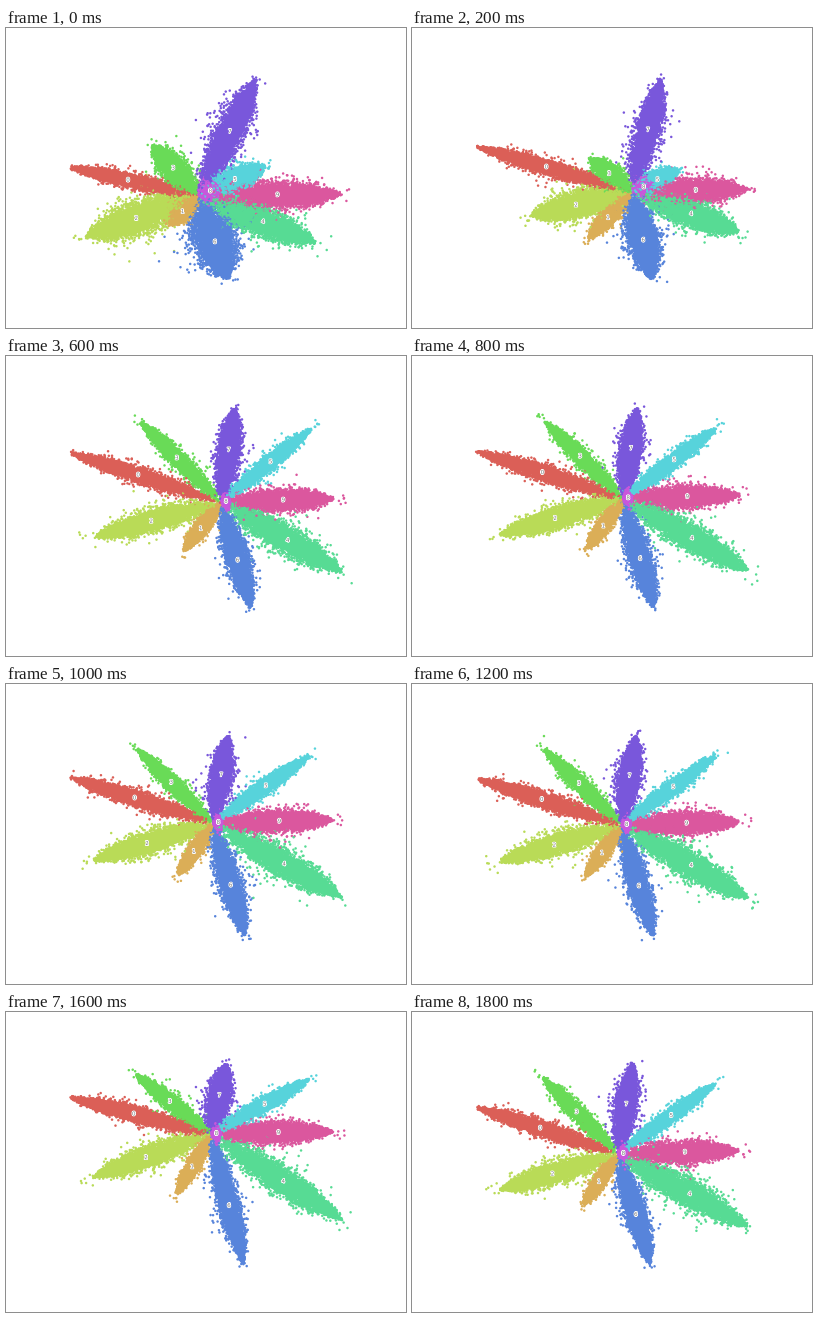
Recreate the animation shown at these times as a matplotlib script. Size 400x300 px, loop 2 s.

```python
import colorsys

import matplotlib.pyplot as plt
import numpy as np
from matplotlib.animation import FuncAnimation
from matplotlib.patheffects import Normal, Stroke

FRAMES, INTERVAL = 10, 200
POINTS = 4500                   # per class
CENTRE = 0.56                   # where a petal's middle lies on its axis
BOX = np.array([[64, 46.5], [346, 256.5]])      # plot limits
REACH = np.array([[67, 53], [334, 250]])        # how far the petals extend

COLORS = np.array([colorsys.hls_to_rgb(i / 10 + 0.01, 0.6, 0.65)
                   for i in range(10)])

# Per class: tip seen from the hub when folded, opening and open,
# then the half width when folded and when open.
PETALS = [
    ((-127, -29), (-150, -45), (-139, -43), 7, 8),
    ((-28, 28), (-42, 47), (-34, 50), 8, 6),
    ((-112, 40), (-98, 24), (-117, 36), 18, 11),
    ((-45, -51), (-40, -33), (-74, -70), 12, 7),
    ((116, 46), (111, 40), (121, 72), 15, 14),
    ((66, -30), (48, -22), (90, -64), 11, 7),
    ((30, 82), (21, 88), (30, 109), 23, 11),
    ((57, -118), (30, -112), (14, -83), 15, 11),
    ((22, -9), (22, -9), (9, -1), 9, 6),
    ((142, -2), (120, -3), (113, -3), 14, 11),
]

# The hub drifts through these points.
HUB_STEPS = [0, 1, 3, 5, 7, 8, 9]
HUB_X = [192, 220, 215, 207, 212, 205, 206]
HUB_Y = [168, 164, 146, 139, 143, 122, 142]


def fit(tips, hub):
    """Stretch each side of the flower so that it fills the plot."""
    low = (REACH[0] - hub) / tips.min(axis=0)
    high = (REACH[1] - hub) / tips.max(axis=0)
    return tips * np.where(tips < 0, low, high)


def petal(rng, hub, tip, half):
    """Points of a soft spindle from the hub to the tip, a few beyond it."""
    s = 1.02 * rng.beta(2.6, 2.1, POINTS)
    side = rng.normal(0, half / 2.4, POINTS) * (4 * s * abs(1 - s)) ** 0.6
    side *= np.where(rng.random(POINTS) < 0.06, 1.9, 1)
    side += rng.normal(0, 0.8, POINTS)
    s[:6] = rng.uniform(1, 1.12, 6)
    normal = np.array([-tip[1], tip[0]]) / np.hypot(*tip)
    return hub + np.outer(s, tip) + np.outer(side, normal)


def flower(i):
    """Positions and classes of all points, and the label spots."""
    rng = np.random.default_rng(40 + i)
    hub = np.array([np.interp(i, HUB_STEPS, HUB_X),
                    np.interp(i, HUB_STEPS, HUB_Y)])
    opened = min(max((i - 1) / 2, 0), 1)
    tips, halves = [], []
    for folded, opening, spread, wide, slim in PETALS:
        start = np.array(folded if i == 0 else opening, float)
        tips.append(start + (np.array(spread) - start) * opened)
        halves.append(slim + (wide - slim) * 0.4 ** i)
    tips = fit(np.array(tips), hub)

    xy = np.vstack([petal(rng, hub, *p) for p in zip(tips, halves)])
    kind = np.repeat(np.arange(10), POINTS)
    inside = ((xy > BOX[0]) & (xy < BOX[1])).all(axis=1)
    order = rng.permutation(np.flatnonzero(inside))
    return xy[order], kind[order], hub + CENTRE * tips


fig = plt.figure(figsize=(4, 3), dpi=100, facecolor="white")
ax = fig.add_axes([0, 0, 1, 1])
ax.set(xlim=(0, 400), ylim=(300, 0))
ax.axis("off")

dots = ax.scatter([], [], s=3.2, linewidths=0)
halo = [Stroke(linewidth=1.2, foreground="white"), Normal()]
labels = [ax.text(0, 0, str(c), fontsize=4, color="#777777", ha="center",
                  va="center", path_effects=halo, zorder=3)
          for c in range(10)]


def draw(i):
    xy, kind, spots = flower(i)
    dots.set_offsets(xy)
    dots.set_facecolor(COLORS[kind])
    for label, spot in zip(labels, spots):
        label.set_position(spot)
    return [dots, *labels]


anim = FuncAnimation(fig, draw, frames=FRAMES, interval=INTERVAL,
                     repeat=True, repeat_delay=0)
plt.show()
```
